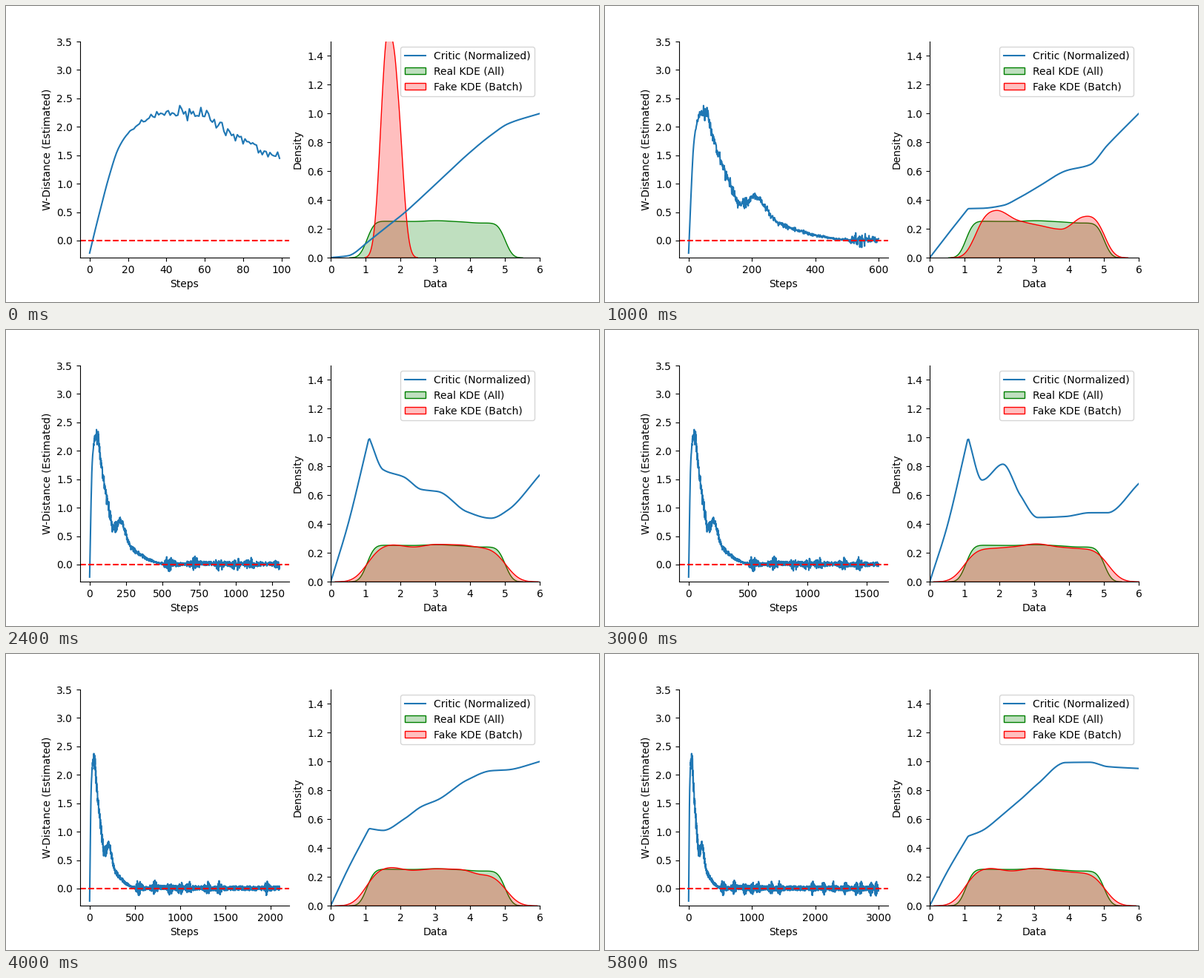
Animation of 800x400 px, one loop 6000 ms. Source, as a matplotlib script:

```python
import math
import numpy as np
import matplotlib.pyplot as plt
from matplotlib.animation import FuncAnimation

FRAMES, INTERVAL, STRIDE = 30, 200, 100
erf = np.vectorize(math.erf)


def smooth(x, px, py):
    """Monotone cubic through the points (px, py), flat outside them."""
    px, py = np.asarray(px, float), np.asarray(py, float)
    h = np.diff(px)
    s = np.diff(py) / h
    m = np.concatenate([s[:1], np.zeros(len(s) - 1), s[-1:]])
    same = s[:-1] * s[1:] > 0
    a, b = s[:-1][same], s[1:][same]
    m[1:-1][same] = 2 * a * b / (a + b)
    i = np.clip(np.searchsorted(px, x) - 1, 0, len(h) - 1)
    t = np.clip((x - px[i]) / h[i], 0, 1)
    return (py[i] * (1 + 2 * t) * (1 - t) ** 2 + py[i + 1] * t * t * (3 - 2 * t)
            + h[i] * t * (1 - t) * (m[i] * (1 - t) - m[i + 1] * t))


def distance_curve():
    """Trend of the estimated distance plus noise that fades, then flares up."""
    t = np.arange(FRAMES * STRIDE)
    trend = [(0, -.22), (3, .2), (6, .6), (10, 1.11), (15, 1.62), (20, 1.88),
             (30, 2.13), (42, 2.25), (58, 2.2), (72, 1.92), (84, 1.72),
             (100, 1.42), (130, 1.0), (160, .63), (185, .68), (207, .77),
             (240, .6), (280, .31), (340, .19), (420, .07), (500, .015), (3000, 0)]
    bursts = [540, 720, 890, 1000, 1100, 1300, 1430, 1960, 2130, 2290, 2480,
              2650, 2720, 2880, 2960]
    flare = sum(np.exp(-((t - c) / 25) ** 2) for c in bursts)
    early = .05 * np.clip((t - 18) / 25, 0, 1) * np.exp(-np.maximum(t - 100, 0) / 180)
    late = np.clip((t - 480) / 40, 0, 1) * (.014 + .032 * flare)
    noise = np.random.default_rng(4).laplace(size=len(t)).clip(-2.8, 2.8)
    return t, smooth(t, *zip(*trend)) + noise * (early + late)


def density(edges, levels):
    """Plateau of unit area with blurred edges; levels shape its top."""
    a, b, blur = edges
    x = np.linspace(a - 3 * blur, b + 3 * blur, 300)
    rise, fall = (erf((x - e) / blur / math.sqrt(2)) for e in (a, b))
    d = (rise - fall) * smooth(x, np.linspace(a, b, len(levels)), levels)
    return x, d / (d.sum() * (x[1] - x[0]))


# The critic bends sharply where the data begins.
KNOTS = [0, .5, 1.1, 1.5, 2.1, 2.6, 3.1, 3.9, 4.6, 5.1, 6]
CX = np.linspace(0, 6, 200)


def critic_curve(v):
    return np.where(CX < KNOTS[2], smooth(CX, KNOTS[:3], v[:3]),
                    smooth(CX, KNOTS[2:], v[2:]))


states = []


def add_state(frame, edges, levels, critic):
    states.append((frame, [np.array(p) for p in (edges, levels, critic)]))


add_state(0, (1.42, 2.03, .15), (.29, .29, .28, .26, .25, .24, .24),
          (0, .013, .115, .193, .308, .417, .53, .71, .85, .93, 1))
add_state(5, (1.28, 5.0, .23), (.3, .333, .263, .227, .201, .287, .32),
          (0, .157, .34, .342, .362, .42, .49, .602, .645, .78, 1))
add_state(9, (1.08, 4.93, .32), (.26, .284, .241, .257, .272, .247, .236),
          (0, .42, 1, .85, .637, .68, .803, .52, .402, .52, .8))
add_state(15, (.99, 5.12, .3), (.24, .232, .242, .262, .24, .23, .23),
          (0, .385, 1, .705, .815, .6, .445, .452, .478, .478, .68))
add_state(20, (1.0, 5.03, .3), (.265, .27, .249, .259, .255, .22, .22),
          (0, .258, .535, .522, .6, .687, .738, .87, .936, .943, 1))
add_state(24, (.97, 5.04, .29), (.265, .263, .264, .235, .22, .235, .225),
          (0, .162, .368, .366, .433, .555, .7, .912, .95, .962, 1))
add_state(29, (1.0, 5.02, .3), (.26, .26, .241, .259, .241, .23, .232),
          (0, .235, .482, .52, .633, .735, .845, .993, .995, .965, .952))


def state_at(frame):
    k = next(i for i in range(len(states) - 1) if frame <= states[i + 1][0])
    (f0, p0), (f1, p1) = states[k:k + 2]
    t = (frame - f0) / (f1 - f0)
    if k == 0:  # the first spread slows down as it settles
        t = 1 - (1 - t) ** 2
    return [a + t * (b - a) for a, b in zip(p0, p1)]


fig, (left, right) = plt.subplots(1, 2, figsize=(8, 4), dpi=100)
fig.subplots_adjust(left=.125, right=.9, bottom=.15, top=.88, wspace=.2)
for ax in (left, right):
    ax.spines[["top", "right"]].set_visible(False)

steps, dist = distance_curve()
dist_line, = left.plot([], [])
left.axhline(0, color="red", linestyle="--")
left.set(ylim=(-.3, 3.5), xlabel="Steps", ylabel="W-Distance (Estimated)")


def shade(x, d, color, label):
    return right.fill_between(x, d, facecolor=(color, .25), edgecolor=color,
                              linewidth=1, label=label)


critic_line, = right.plot(CX, 0 * CX, label="Critic (Normalized)")
shade(*density((1.03, 5.0, .17), (.256, .253, .252, .257, .25, .241, .242)),
      "green", "Real KDE (All)")
fake_area = shade([0, 1], [0, 0], "red", "Fake KDE (Batch)")
right.set(xlim=(0, 6), ylim=(0, 1.5), xlabel="Data", ylabel="Density")
right.legend(loc="upper right")


def update(frame):
    n = (frame + 1) * STRIDE
    dist_line.set_data(steps[:n], dist[:n])
    left.set_xlim(-.05 * (n - 1), 1.05 * (n - 1))
    edges, levels, critic = state_at(frame)
    critic_line.set_ydata(critic_curve(critic))
    x, d = density(edges, levels)
    fake_area.set_verts([[(x[0], 0), *zip(x, d), (x[-1], 0)]])
    return dist_line, critic_line, fake_area


anim = FuncAnimation(fig, update, frames=FRAMES, interval=INTERVAL,
                     init_func=lambda: update(0), repeat=True, repeat_delay=0)
plt.show()
```
